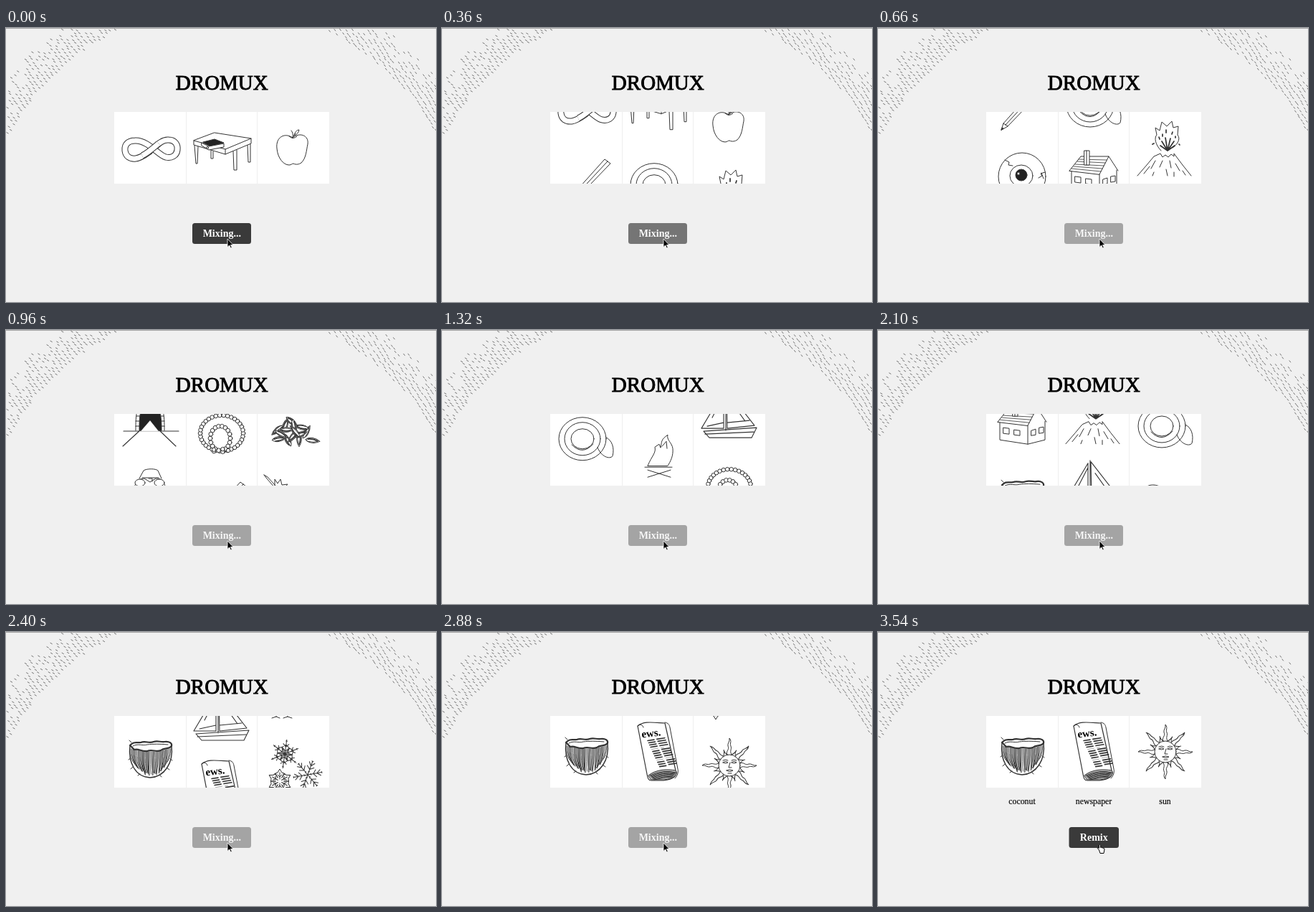
Animation of 600x382 px, one loop 3.6 s. Source, as an HTML page:

```html
<!DOCTYPE html>
<html lang="en">
<meta charset="utf-8">
<title>Picture mixer</title>
<style>
  html, body { margin: 0; width: 100%; height: 100%; overflow: hidden; background: #f0f0f0; }
  svg { display: block; }
  text { font-family: "Liberation Serif", "Times New Roman", serif; text-anchor: middle; }
  .art { stroke: #333; stroke-linecap: round; stroke-linejoin: round; }
  .art text { stroke: none; }
  .title { font-size: 29px; stroke: #000; stroke-width: .9; }
  .label { font-size: 11.8px; stroke: #000; stroke-width: .15; }
  .caption { font-size: 14px; font-weight: bold; fill: #fff; }
</style>
<svg id="stage" width="600" height="382" viewBox="0 0 600 382">
  <rect width="600" height="382" fill="#f0f0f0"/>
  <path d="M0 .5H600" stroke="#a6a6a6"/>
  <path id="hatch" stroke="#555" stroke-width=".8"/>
  <text class="title" x="301.3" y="86.4">DROMUX</text>
  <g id="reels"></g>
  <path d="M251.5 117V217M350.5 117V217" stroke="#eee"/>
  <g id="labels">
    <text class="label" x="201" y="240">coconut</text>
    <text class="label" x="301" y="240">newspaper</text>
    <text class="label" x="400.5" y="240">sun</text>
  </g>
  <g id="button">
    <rect id="plate" y="272" height="29" rx="3.5" fill="#3a3a3a"/>
    <text id="caption" class="caption" x="301.3" y="291"></text>
  </g>
  <path id="arrow" d="M309 294V305.5L311.7 303L313.6 307L315.3 306.2L313.5 302.5H317Z" fill="#000" stroke="#fff" stroke-width=".8"/>
  <path id="hand" d="M308.5 304L306 301.2Q306.5 299.6 308.4 301.4V297Q309.4 295.6 310.4 297V300.4Q312 299.6 312.5 301Q314 300.3 314.4 301.7Q316 301.2 316 303L315 308.5H310Z" fill="#fff" stroke="#000"/>
</svg>
<script>
const $ = id => document.getElementById(id);
const TAU = Math.PI * 2;

let seed = 7;
const random = () => (seed = seed * 16807 % 2147483647) / 2147483647;
const repeat = (n, draw) => Array.from({ length: n }, (_, i) => draw(i)).join('');

const path = (d, fill = 'none', width = 1) => `<path d="${d}" fill="${fill}" stroke-width="${width}"/>`;
const oval = (x, y, rx, ry = rx, fill = 'none') =>
  `<ellipse cx="${x}" cy="${y}" rx="${rx}" ry="${ry}" fill="${fill}" stroke-width="1"/>`;
const place = (x, y, turn, inner) => `<g transform="translate(${x} ${y}) rotate(${turn})">${inner}</g>`;
const spokes = (n, inner, start = 0) => repeat(n, i => place(0, 0, start + i * 360 / n, inner));
const band = (d, width) =>
  `<g fill="none" stroke-linecap="butt"><path d="${d}" stroke-width="${width + 2}"/><path d="${d}" stroke="#fff" stroke-width="${width}"/></g>`;
const beads = (n, x, y, rx, ry, r) =>
  repeat(n, i => oval(x + rx * Math.cos(i * TAU / n), y + ry * Math.sin(i * TAU / n), r, r, '#fff'));

const seedShape = path('M-10 0C-5 -5 4 -4 10 0C4 4 -5 5 -10 0Z', '#fff')
  + path('M-7 -1Q0 -3 7 0', 'none', 1.8) + path('M-6 2Q0 3 6 1');
const flake = (x, y, turn, arm) => place(x, y, turn, spokes(6, path(arm)));
// A pointed prism standing on (x, y).
const prism = (x, y, turn, length, w) => place(x, y, turn,
  path(`M${-w} 0V${w * 1.4 - length}L0 ${-length}L${w} ${w * 1.4 - length}V0ZM${-w} ${w * 1.4 - length}L${w * .3} ${w * 2 - length}L${w} ${w * 1.4 - length}M${w * .3} ${w * 2 - length}V0`, '#fff'));

const art = {
  infinity: band('M1 4C12 -6 18 -12 26 -11C35 -11 39 -4 38 3C37 11 30 15 22 13C12 11 -3 -11 -21 -10C-30 -10 -36 -5 -35 4C-34 12 -28 16 -20 15C-12 14 -6 9 1 4', 7)
    + band('M-11 11C-4 8 5 0 12 -6', 7),
  pencil: path('M-29 35L-26 26L26 -32L34 -26L-20 30ZM-26 26L-20 30M-23 28L30 -29') + path('M-29 35L-28 32L-26 33Z', '#222'),
  eye: oval(0, 0, 33) + oval(-1, -1, 16, 15) + oval(-1, -2, 8, 8, '#222') + oval(-5, -4, 2, 2, '#fff')
    + path('M-24 -23L-18 -20L-19 -16L-13 -15M32 -6L26 -4L28 -1L23 2M27 -5L30 3'),
  tunnel: path('M-20 18C-20 -2 -20 -26 0 -26S20 -2 20 18', '#fff') + path('M-15 18C-15 0 -15 -20 0 -20S16 0 16 18Z', '#222')
    + path('M-13 19L0 4L12 19Z', '#fff', .3)
    + path('M-20 12H-15M-20 5H-15M-19 -2H-14M-17 -11L-13 -9M16 12H20M16 5H20M15 -2H19M17 -11L13 -9M-37 19H-15M16 19H40M-13 17L-38 40M12 17L36 40', 'none', 1.1),
  car: path('M-15 -15L-9 -26C-5 -29 8 -29 11 -26L16 -15M-11 -16H12M-22 8C-24 -6 -18 -15 -8 -15L0 -10L8 -15C18 -16 23 -6 22 8ZM-2 -15H3V-11M-18 8V16H-10V8M10 8V16H18V8')
    + oval(-14, -9, 7, 5, '#fff') + oval(13, -9, 7, 5, '#fff'),
  key: path('M-18 -3C-14 -4 -12 -1 -8 -3H42V1H-8C-12 -1 -14 2 -18 1ZM27 1V11L30 13L32 10L35 13L38 10L41 13V8L37 7V4H42V1', '#fff')
    + oval(-28, -1, 12, 13, '#fff') + oval(-29, -5, 4.3) + oval(-29, 3, 4.8)
    + repeat(5, i => oval([-13, -8, 8, 12, 23][i], -1, 1.4, 3.6, '#fff')),
  coconut: path('M-28 -13C-31 12 -20 31 0 32C20 31 33 12 30 -13Z', '#fff', 1.4)
    + repeat(31, i => {
      const u = -1 + i / 15, depth = 31 * Math.sqrt(1 - u * u * .8);
      return path(`M${u * 28 + 1} ${-7 + 3 * Math.cos(u * 2)}Q${u * 28} ${depth * .5} ${u * 21 + random() * 3} ${depth * (.8 + random() * .18)}`, 'none', .7 + random() * .6);
    })
    + path('M-28 -13C-23 -19 -18 -16 -13 -17C-6 -20 -2 -15 5 -18C11 -20 15 -17 20 -18C27 -19 31 -16 30 -12C26 -7 20 -10 15 -6C9 -3 3 -8 -4 -5C-12 -4 -16 -9 -22 -7Z', '#fff', 2.2)
    + path('M-24 -12C-17 -16 -10 -12 -4 -14C5 -15 13 -15 25 -14M-27 5L-30 7M-24 17L-27 20M-14 27L-17 29M28 6L31 8M23 18L27 21M13 28L16 31M-26 -17L-29 -20'),

  table: path('M-38 -3L-36 22H-34L-33 -2M-15 4V15H-12V5M16 5L17 31H21V3M36 -4L37 20H40V-6')
    + path('M-39 -10V-4L5 9L41 -6V-13L-10 -21Z', '#fff') + path('M-39 -10L5 2L41 -13M5 2V9')
    + path('M-26 -8L-10 -12L3 -7L-16 -2Z', '#222') + path('M-28 -7L-18 -2L3 -6V-1L-18 3L-28 -3Z', '#fff') + oval(-20, 0, 1.5),
  cup: oval(-5, 8, 33, 30) + oval(-5, 8, 25, 23, '#fff') + oval(-5, 8, 16, 14) + path('M16 20C21 33 33 37 37 32C40 20 36 10 28 6M-20 16Q-5 32 10 15'),
  house: path('M-34 -1L-18 -21L21 -21L8 4ZM21 -21L34 -1M-31 0V24L8 30L32 24V-2M8 4V30')
    + path('M-31 -4L10 0M-28 -7L12 -4M-26 -10L14 -8M-23 -14L16 -12M-21 -17L18 -16', 'none', .8)
    + path('M-13 -29H-6V-9H-13ZM-10 -29V-9', '#fff') + path('M-26 7L-18 8V16L-26 15ZM-11 10L-3 11V18L-11 17ZM13 11L19 9V17L13 18ZM24 7L30 6V14L24 15Z'),
  necklace: beads(34, 0, 0, 30, 25, 2.8) + beads(18, -2, 7, 14, 17, 2.9) + beads(5, -2, 24, 11, 2, 2.7),
  bed: path('M-40 -18V20M-40 15L-15 24M-40 18L-15 28M-15 5V34H-11V8M-40 0L-15 5L38 -4V27H40V-10M-11 25C-5 29 0 23 7 27S20 25 26 28S34 26 38 25M-38 -8L10 -18L38 -4M-34 -10V-18L-14 -22V-14'),
  bridge: path('M-38 -5C-22 -26 18 -31 37 -1M-38 2C-20 -16 16 -24 33 6M-40 6C-18 -10 10 -8 20 28M-38 11C-20 -6 2 -2 15 30M-39 8V-5', 'none', 1.2)
    + path('M-33 -11V3M-31 -13L-26 -3M-26 -16V-4M-21 -18L-17 -7M-17 -20V-8M-7 -23V-10M4 -23V-9M14 -20V-5M24 -14V2M33 -6V13M-36 -5L-28 -8M-30 -2L-22 -12M-2 -6L8 -12M10 4L22 -5M18 16L30 5'),
  boat: path('M-36 22L38 17L31 31H-28ZM-34 26L34 23M-39 18L-8 -34V18ZM-4 -36L35 14L-3 18ZM-5 -38V21M-31 15L-8 10M-3 10L28 7M-24 3L-8 -28M2 -20L22 8', 'none', 1.1),
  newspaper: path('M-28 -36C-20 -43 -8 -41 10 -40L25 26C28 34 22 38 8 40H-9C-13 40 -14 37 -15 31Z', '#fff', 1.2)
    + path('M-28 -36C-25 -39 -21 -38 -20 -34M10 -41C15 -40 16 -38 17 -34L28 24C29 28 28 33 24 37')
    + place(0, 0, -7, '<text x="-6" y="-22" font-size="15" font-weight="bold">ews.</text>')
    + place(-11, -16, -9, repeat(13, i => path(`M${i * .9 - 3} ${i * 3.2}h9M${i * .9 + 10} ${i * 3.2 - (i > 4 ? 1 : 0)}h${i === 4 ? 4 : 11}`, 'none', i % 5 === 4 ? .4 : 1.7)))
    + path('M-13 33C-2 24 14 24 25 26C29 30 25 37 9 39H-9Z', '#bbb')
    + repeat(7, i => path(`M${-11 + i} ${33 + i}Q8 ${24 + i * 2} ${26 - i} ${29 + i}`, 'none', 1)),

  apple: path('M-1 -14C-12 -22 -25 -15 -23 1C-22 14 -14 24 -6 24C-3 24 -2 22 0 22C4 24 8 23 11 21C18 14 18 4 20 -5C22 -18 8 -22 -1 -14ZM-1 -14C0 -18 -1 -22 -3 -24M1 -17C2 -22 5 -25 8 -25C7 -21 5 -18 1 -17M-2 -14L1 -17L3 -20M-6 -16Q0 -11 5 -16'),
  volcano: path('M-39 39L-26 24L-16 12L-7 8L-4 13L0 10L4 13L8 9L12 12V8L24 24L36 39M-22 26L-30 36M-14 18L-20 29M-16 34L-18 39M-4 18L-8 27M6 18L8 28M14 22L20 32M1 30L3 39M24 32L28 38M12 34V40')
    + path('M-6 4C-14 -4 -16 -14 -12 -18L-14 -28L-8 -24L-5 -36L2 -30L9 -37L11 -28L18 -30L17 -18C22 -12 16 -4 10 0')
    + path('M3 4L-5 -9M3 4L0 -14M3 4L7 -13M3 4L12 -9M3 4L-7 -3M3 4L13 -3M-4 -16V-19M1 -21V-25M9 -19L10 -22M-8 -12L-9 -15M14 -14V-16M-16 -6L-18 -5M19 -5L20 -4', 'none', 1.7),
  seeds: repeat(14, i => {
    const a = i * 2.4, r = 5.4 * Math.sqrt(14 - i);
    return place(-4 + 1.1 * r * Math.cos(a), 2 + .75 * r * Math.sin(a), i * 50 - 60, seedShape);
  }) + place(27, 14, 8, seedShape),
  branch: path('M-41 -38L-38 -34L14 26M-41 -38L-36 -35L18 24M-26 -22V-32L-22 -26L-18 -32L-16 -24L-8 -25L-14 -18M-20 -14L-28 -8M-6 2L-14 8M0 2L8 -6'),
  crystals: prism(-4, 18, -44, 54, 6) + prism(-19, 20, -28, 26, 4) + prism(-17, 20, 4, 30, 4.5)
    + prism(21, 16, 20, 28, 3.5) + prism(29, 14, 16, 25, 3.5) + prism(12, 14, -6, 18, 4)
    + prism(-4, 24, 26, 54, 7) + prism(-10, 24, -20, 14, 4)
    + beads(7, 24, 19, 8, 4, 3) + path('M-30 18L-16 25L-2 26L6 22'),
  flame: path('M-14 2C-8 -12 -2 -16 -4 -24L2 -28L4 -23C6 -32 4 -34 14 -41C12 -34 20 -30 21 -22C22 -12 18 -4 14 2ZM6 -25L12 -32L13 -22M-18 4H20M-14 8L18 18M18 8L-14 18'),
  bird: path('M-34 0C-24 -16 -8 -10 2 -2L36 -8L12 14C-4 22 -24 16 -34 0ZM-22 16L-24 29L-30 31M-24 29L-19 31M-10 17L-8 29L-14 31M-8 29L-2 31M-26 -4h1'),
  snow: flake(-12, -19, 8, 'M0 0V-20M-1 -18H1M-4 -14L0 -10L4 -14M-5 -9L0 -13L5 -9L0 -4ZM-5 -9L0 0')
    + flake(20, 10, 20, 'M0 0V-20M-1 -20H1M-4 -18L0 -13L4 -18M-5 -12L0 -8L5 -12M-1 -4L1 -5')
    + flake(-19, 19, 0, 'M-3 -5L-6 -11L-3 -12L0 -17L3 -12L6 -11L3 -5M0 -3V-12M-3 -9L0 -6L3 -9'),
  sun: spokes(8, path('M-3 -14C-6 -20 1 -22 -2 -27C-3 -31 1 -33 0 -38C4 -33 0 -31 2 -27C4 -22 -1 -20 4 -14'))
    + spokes(8, path('M-4 -14Q0 -17 1 -23Q0 -18 4 -14', '#fff'), 22.5) + oval(0, 0, 15, 15, '#fff')
    + path('M-9 -4Q-5 -7 -2 -4Q-5 -2 -9 -4M3 -4Q6 -7 10 -4Q7 -2 3 -4M-9 -7Q-5 -9 -2 -7M3 -7Q6 -9 10 -7M1 -4L-1 3H3M-4 7Q0 5 5 7Q1 10 -4 7M-2 11H3'),
};

// Each reel: pictures from first to last, then [time, distance] waypoints.
const reels = [
  ['infinity pencil eye tunnel car boat cup seeds apple key house coconut',
    [[60, 0], [660, 160], [960, 345], [1740, 902], [2400, 1096], [2520, 1100]]],
  ['table cup house necklace pencil key flame eye bed bridge volcano boat newspaper',
    [[60, 0], [660, 167], [960, 323], [1740, 869], [2400, 1147], [2780, 1200]]],
  ['apple volcano seeds branch boat necklace house crystals flame cup bird snow sun',
    [[60, 0], [660, 100], [960, 227], [1740, 724], [2400, 1078], [2880, 1181], [3090, 1200]]],
];

$('reels').innerHTML = reels.map(([names], i) =>
  `<svg x="${151 + i * 100}" y="117" width="100" height="100"><rect width="100" height="100" fill="#fff"/><g class="art strip">`
  + names.split(' ').map((name, k) => place(0, k * 100, 0, art[name])).join('') + '</g></svg>').join('');
const strips = document.querySelectorAll('.strip');

// Slanted dashes inside a ring that crosses both top corners, thinner towards the corners.
let dashes = '';
for (let y = 1, row = 0; y < 154; y += 4.5, row++)
  for (let x = row * 3 % 8; x < 600; x += 7.5) {
    const px = x + random() * 2.5, py = y + random() * 2;
    const depth = (Math.hypot(px - 300, py - 306) - 337) / 49;
    if (depth > 0 && random() > depth ** 2) dashes += `M${px} ${py}${px < 300 ? 'l3 1.8' : 'l2.2 2.8'}`;
  }
$('hatch').setAttribute('d', dashes);

const clamp = v => Math.max(0, Math.min(1, v));

// Smooth monotone curve through the waypoints, at rest at both ends.
function distance(keys, t) {
  const last = keys.length - 1;
  if (t <= keys[0][0]) return 0;
  if (t >= keys[last][0]) return keys[last][1];
  const slope = i => (keys[i + 1][1] - keys[i][1]) / (keys[i + 1][0] - keys[i][0]);
  const speed = i => {
    if (i === 0 || i === last) return 0;
    const a = slope(i - 1), b = slope(i);
    return 2 * a * b / (a + b);
  };
  const i = keys.findIndex(key => key[0] > t) - 1;
  const [t0, y0] = keys[i], [t1, y1] = keys[i + 1];
  const h = t1 - t0, u = (t - t0) / h, w = 1 - u;
  return y0 * (1 + 2 * u) * w * w + speed(i) * h * u * w * w
    + y1 * u * u * (3 - 2 * u) - speed(i + 1) * h * u * u * w;
}

function draw(now) {
  const t = Math.floor(now % 3600 / 60) * 60;
  reels.forEach(([, keys], i) =>
    strips[i].setAttribute('transform', `translate(50 ${50 - distance(keys, t)})`));

  const done = t >= 3120, shown = clamp((t - 3120) / 400);
  $('caption').textContent = done ? 'Remix' : 'Mixing...';
  $('plate').setAttribute('x', done ? 266.5 : 260);
  $('plate').setAttribute('width', done ? 69.5 : 82);
  $('button').setAttribute('opacity', done ? .41 + .59 * shown : 1 - .59 * clamp((t - 60) / 540));
  $('labels').setAttribute('opacity', shown);
  $('arrow').setAttribute('visibility', done ? 'hidden' : 'visible');
  $('hand').setAttribute('visibility', done ? 'visible' : 'hidden');
}

const start = performance.now();
(function tick() {
  draw(performance.now() - start);
  requestAnimationFrame(tick);
})();
</script>
</html>
```
